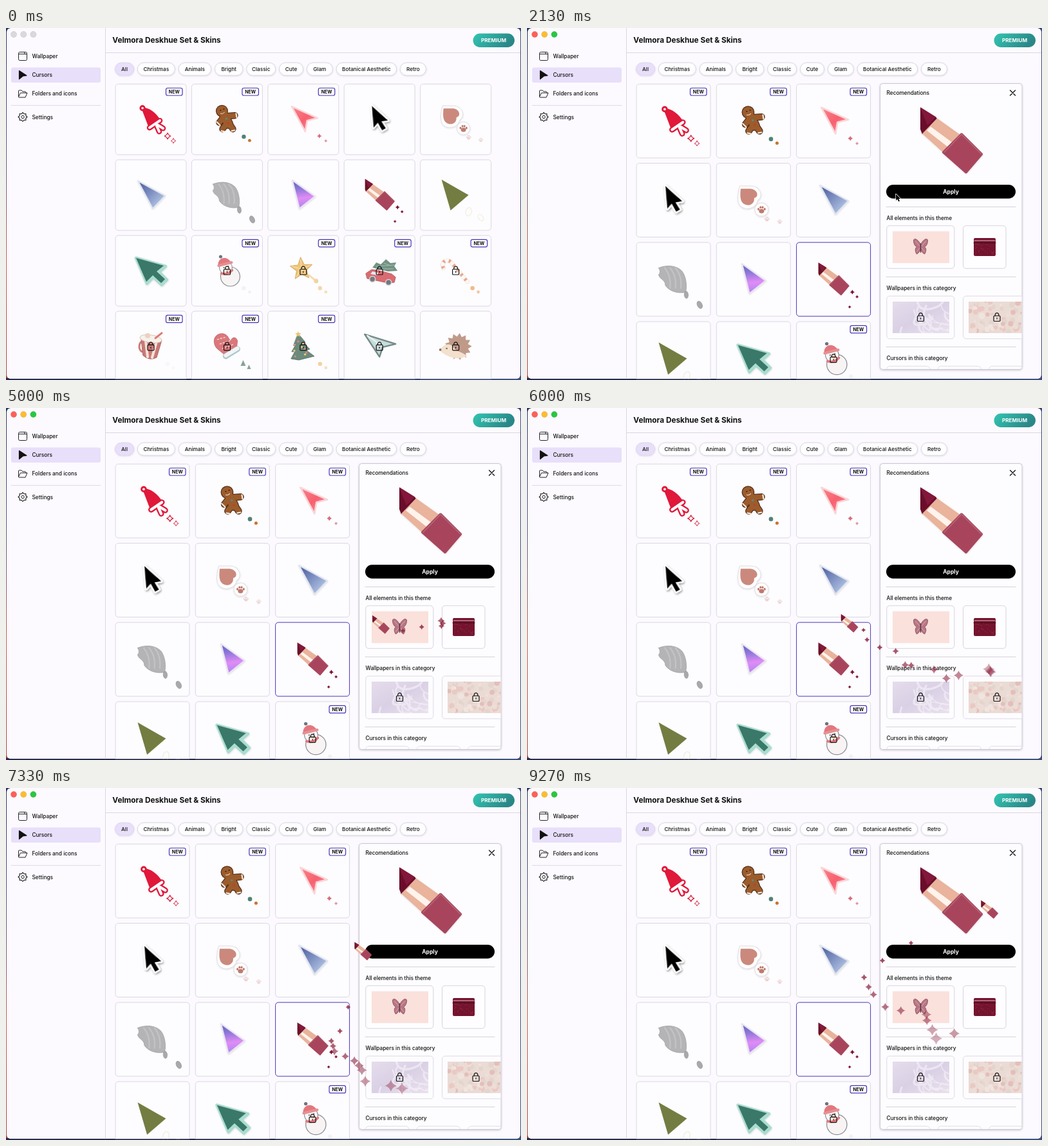
Recreate the animation shown at these times as an HTML page. Size 800 by 548 pixels, loop 9.34 s.

```html
<!DOCTYPE html>
<html lang="en">
<head>
<meta charset="utf-8">
<title>Desktop cursors</title>
<style>
  html, body { margin: 0; width: 100%; height: 100%; overflow: hidden; background: #20284c; }
  svg { display: block; width: 800px; height: 548px; }
  text { font-family: Inter, "Open Sans", sans-serif; font-size: 8.3px; font-weight: 500; fill: #111; }
  .bold { font-weight: 700; }
  .mid { text-anchor: middle; }
</style>
</head>
<body>
<svg id="stage" viewBox="0 0 800 548"></svg>
<script>
const LOOP = 9.34, OPEN = 1.35, APPLY = 4.2;

let seed = 7;
const rnd = (a, b) => {
  seed = seed * 16807 % 2147483647;
  return a + (b - a) * seed / 2147483647;
};
const times = (n, fn) => Array.from({ length: n }, (_, i) => fn(i));
const repeat = (n, fn) => times(n, fn).join('');

// ---- drawing helpers ----
const path = (d, fill = 'none', stroke = 'none', w = 1, more = '') =>
  `<path d="${d}" fill="${fill}" stroke="${stroke}" stroke-width="${w}" stroke-linejoin="round" stroke-linecap="round" ${more}/>`;
const poly = (pts, ...style) => path(`M${pts}Z`, ...style);
const line = (d, color, w = 1, more = '') => path(d, 'none', color, w, more);
const rect = (x, y, w, h, r, fill = 'none', stroke = 'none', more = '') =>
  `<rect x="${x}" y="${y}" width="${w}" height="${h}" rx="${r}" fill="${fill}" stroke="${stroke}" ${more}/>`;
const oval = (x, y, rx, ry, fill, stroke = 'none', w = 1, more = '') =>
  `<ellipse cx="${x}" cy="${y}" rx="${rx}" ry="${ry}" fill="${fill}" stroke="${stroke}" stroke-width="${w}" ${more}/>`;
const dot = (x, y, r, ...style) => oval(x, y, r, r, ...style);
const text = (s, x, y, cls = '', css = '') => `<text x="${x}" y="${y}" class="${cls}" style="${css}">${s}</text>`;
const group = (inner, more = '') => `<g ${more}>${inner}</g>`;
const place = (inner, x, y, k = 1, turn = 0) => group(inner, `transform="translate(${x} ${y}) rotate(${turn}) scale(${k})"`);
const clip = (id, x, y, w, h, r = 0) => `<clipPath id="${id}">${rect(x, y, w, h, r, '#000')}</clipPath>`;
const grad = (id, colors, x2 = 1, y2 = 1) => `<linearGradient id="${id}" x1="0" y1="0" x2="${x2}" y2="${y2}">` +
  colors.map((c, i) => `<stop offset="${i / (colors.length - 1)}" stop-color="${c}"/>`).join('') + '</linearGradient>';

// n-pointed outline whose corners alternate between two radii
const burst = (n, outer, inner, turn = 0) => times(2 * n, i => {
  const a = turn + (i / n - .5) * Math.PI, r = i % 2 ? inner : outer;
  return [(r * Math.cos(a)).toFixed(2), (r * Math.sin(a)).toFixed(2)];
}).join(' ');

const SPARK = 'M0-1Q.25-.25 1 0Q.25.25 0 1Q-.25.25-1 0Q-.25-.25 0-1Z';
const spark = (x, y, r, fill, stroke = 'none') => place(path(SPARK, fill, stroke, .25), x, y, r);
const trail = (c, d = c) => dot(81, 82, 3.2, c) + dot(90, 88, 2.4, d);
const paw = (x, y, k, c) => place(oval(0, 2, 3.4, 2.8, c) +
  repeat(4, i => oval(i * 2.7 - 4, -3.2 + 1.2 * (i - 1.5) ** 2, 1.3, 1.6, c)), x, y, k);
const lock = (x, y) => place(rect(-5, -3, 10, 8.5, 1.3, 'none', '#111', 'stroke-width="1.2"') +
  line('M-2.8-3V-4.5a2.8 2.8 0 0 1 5.6 0V-3M0 .4V2', '#111', 1.2), x, y);

const ARROW = '0 0 1 34 8 27 14 39 20 36 14 25 24 24';
const shade = 'filter="url(#soft)"', deep = 'filter="url(#deep)"';

const lipstick =
  poly('1 0 25 15 28 19 4 42 1 34', '#6b1129') + poly('1 0 25 15 12 28', '#82193a') +
  poly('4 41 27 17 62 42 36 70', '#e9b39c') + poly('11 36 17 30 51 55 44 62', '#fff3ec') +
  poly('37 70 65 42 96 73 72 101', '#a8455c', '#a8455c', 4) + line('M38 70L65 42 96 73', '#b8687b', 1.2);

const doll = 'M50 51L43 60M54 50L67 49M54 62L48 70M58 61L64 70';
const gingerbread = (color, grow) => line(doll, color, 8 + grow) + line('M51 50L57 62', color, 13 + grow) + dot(47, 42, 8.3 + grow / 2, color);
const brim = 'M53 68L69 57M64 65L68 74M66 64L74 69';
const cane = 'M36 51C31 41 42 34 49 43L73 72';
const fir = 'M47 35L58 48 55 49 65 59 60 61 72 70 48 76 36 74 42 63 37 63 44 51 41 51Z';

// ---- cursor pictures in a 110 x 110 cell ----
const icons = [
  // santa hat
  path('M42 38C52 38 62 46 68 56L53 67Z', '#e0183a', '#e0183a', 3) + line(brim, '#e0183a', 8.5) + line(brim, '#fff', 4) +
  dot(42, 37.5, 3.2, '#fff', '#e0183a', 2.8) + spark(81, 81, 4.8, '#fff', '#d4223f') + spark(90, 88.5, 3.7, '#fff', '#d4223f'),
  // gingerbread
  gingerbread('#55301d', 2.4) + gingerbread('#9c5c2c', 0) +
  line('M39 59L44 64M69 46L70 52M46 73L51 74M62 73L67 72', '#fbefe4', 2) +
  dot(45, 41, 1, '#3b1e12') + dot(50, 39, 1, '#3b1e12') + line('M45 46Q49 47 51 44', '#f3ddc9') +
  dot(54, 54, 1.7, '#5d8a78') + dot(57, 61, 1.5, '#c33b35') + trail('#4f8275', '#c9742f'),
  // pink arrow
  poly('37 35 77 53 61 57 58 74', 'url(#pink)', '#fbd5d8', 2.5) + spark(80, 81, 3.6, '#d76e7c') + spark(90, 88.5, 2.6, '#dc929b'),
  // black arrow
  place(poly(ARROW, '#000', '#fff', 4.5, 'paint-order="stroke" ' + deep), 43, 34, 1, -3),
  // heart and paw
  path('M35 34H52C66 35 70 50 61 56C59 68 44 70 37 65C30 60 31 45 35 34Z', '#fff', '#e3e0e3', 1, shade) +
  dot(67, 69, 10, '#fff', '#e3e0e3', 1, shade) +
  path('M36 38H51C61 39 64 50 56 52C57 62 46 65 40 60C35 56 35 48 36 38Z', '#cb897d') +
  paw(67, 69, 1.15, '#c07a70') + paw(75, 83, .75, '#ecd3d2') + paw(94, 87, .7, '#ecd9d8'),
  // blue triangle
  poly('35 33 77 56 58 76', 'url(#blue)', '#dfe4ee', 2, shade),
  // marble drop
  path('M33 38C45 33 60 34 68 43C75 53 75 68 73 74C61 77 48 72 43 64C43 55 34 55 33 48C36 45 35 41 33 38Z', '#b4b4b6', '#a2a2a5', .8) +
  repeat(3, i => line(`M${42 + i * 8} 38Q${52 + i * 8} 50 ${50 + i * 8} 68`, '#c3c3c5', 2)) +
  place(oval(0, 0, 3, 5.4, '#a9a9ac', '#919195', .6), 74, 78, 1, -5) + place(oval(0, 0, 3.6, 5.8, '#a9a9ac', '#919195', .6), 94, 93, 1, -25),
  // violet triangle
  poly('38 32 73 57 49 76', 'url(#violet)', '#e9e2f2', 2, shade),
  // lipstick
  place(lipstick, 32, 30, .475) + spark(83, 74, 3.4, '#7a1230') + spark(90, 81, 2.5, '#7a1230') + spark(79, 96, 2.4, '#7a1230'),
  // olive triangle
  poly('33 31 75 55 47 79', '#737d42') +
  place(oval(0, 0, 4.5, 6.5, 'none', '#f2eedd', 1.2), 75, 81, 1, 15) + place(oval(0, 0, 3.5, 5.5, 'none', '#f2eedd', 1.2), 94, 90, 1, -35),
  // teal arrow
  poly('32 35 78 48 68 57 80 69 72 77 59 65 49 75', '#aadccf', '#aadccf', 4.5, shade) +
  poly('32 35 75 47 64 56 77 68 71 74 58 62 48 72', '#3a7869'),
  // snowman
  dot(60, 64, 15, '#f5f2f0', '#59616c', 1.2) + dot(53, 50, 10, '#f8f5f3', '#59616c') +
  path('M41 47C40 34 55 30 62 43Z', '#d8454c') + line('M42 47L62 42', '#e0666a', 4) + dot(45, 33, 2.6, '#394054') +
  line('M46 59Q56 62 63 54', '#d8454c', 3.5) + dot(50, 50, 1, '#222') + dot(57, 48, 1, '#222') + line('M53 53L57 54', '#e9893c', 2) +
  trail('#efedf2'),
  // star
  line('M64 62L75 71', '#f3d296', 3) + place(poly(burst(5, 18, 8), '#e9b04a', '#cf8a28') +
    repeat(5, i => group(line('M0 0V-15', '#f9dc98'), `transform="rotate(${i * 72})"`)), 52, 52, 1, -4) +
  dot(75, 71, 3.4, '#f0c47c') + trail('#f2c98c', '#f3d6a9'),
  // car and tree
  poly('44 50 50 42 57 45 65 37 72 43 81 42 78 48 83 55 68 56', '#3f6a55') +
  line('M50 48L78 46M58 52L76 52M62 43L72 47', '#83a894') +
  poly('34 59 43 53 56 55 74 60 80 65 78 73 68 74 36 67', '#cc343b', '#9c2630') +
  poly('44 56 53 58 52 62 41 60', '#d9e7e7') + dot(44, 68, 4.5, '#42464e', '#c9c9cc', 1.5) + dot(69, 73, 4.5, '#42464e', '#c9c9cc', 1.5),
  // candy cane
  line(cane, '#ecd2c0', 6.4) + line(cane, '#fff8f1', 5.2) +
  line(cane, '#df8868', 5.2, 'stroke-dasharray="3.4 6" style="stroke-linecap:butt"') + trail('#eca05d', '#efb67e'),
  // mug
  oval(42, 55, 5, 8, 'none', '#b94a45', 3) + path('M40 41L72 45 64 72Q53 78 43 69Z', '#b94842', '#8e302f') +
  line('M47 46L50 71M64 47L57 72', '#f0dccd', 4) + place(oval(0, 0, 17, 6, '#f6eee6', '#cfae98'), 55, 43, 1, 8) +
  line('M62 42L72 34', '#d1473f', 3) + dot(50, 38, 4, '#e4c3aa') + trail('#f8f4f6'),
  // mitten
  path('M35 47C34 35 51 30 57 41L61 48C60 41 69 38 71 46L70 58 54 70 43 61Q35 56 35 47Z', '#cf454a', '#b0363f') +
  line('M53 70L71 59', '#91b2bb', 9) + line('M53 69L71 58', '#eff1f1', 6) +
  repeat(3, i => line(`M${40 + i * 4} ${44 + i * 7}L${54 + i * 5} ${40 + i * 6}`, '#f1d9d6', 1.4, 'stroke-dasharray="2 3"')) +
  poly('80 76 84 85 76 85', '#598270') + poly('89 83 92 90 86 90', '#598270'),
  // tree
  path(fir, '#355f4a', '#274938') + place(poly(burst(5, 5, 2.2), '#e3b13f'), 47, 36) +
  repeat(9, i => dot(47 + 7 * Math.sin(i * 2.2) * (1 + i / 9) + i, 47 + i * 2.9, 1.6, i % 2 ? '#e7b84d' : '#d6584e')) + trail('#f0c17d', '#f3d6a7'),
  // silver arrow
  poly('32 36 80 51 60 56 55 71', '#b4d0cb', '#3d5f5c', 2.4) + line('M36 38L59 54', '#e8f1ef', 2),
  // hedgehog
  place(poly(burst(13, 21, 15.5), '#a9755d'), 59, 55, 1, 6) +
  path('M30 60C37 51 46 48 52 57C58 64 68 64 72 70Q60 76 46 71Q32 65 30 60Z', '#f0d6bb') + dot(31, 60, 1.8, '#51342a') + dot(41, 58, 1.2, '#332')
];
const isNew = i => i < 3 || (i > 10 && i < 18);

function grid(cols, count, w, dx, dy) {
  return repeat(count, i => {
    const x = 170 + i % cols * dx, y = 87.2 + Math.floor(i / cols) * dy;
    const locked = i > 10, chosen = cols === 3 && i === 8;
    return rect(x, y, w, w, 4.5, '#fdfcfe', chosen ? '#4a38bd' : '#dad8e0') +
      group(place(icons[i], x, y, w / 110), locked ? 'opacity=".72"' : '') +
      (locked ? lock(x + w / 2, y + w / 2 + .5) : '') +
      (isNew(i) ? rect(x + w - 31.5, y + 6.3, 25.5, 11.5, 2.5, '#fff', '#4635bb', 'stroke-width="1.2"') +
        text('NEW', x + w - 18.7, y + 14.6, 'bold mid', 'font-size:7px') : '');
  });
}

function sidebar() {
  return rect(8, 61.5, 139, 23.5, 3, '#e8dffa') +
    ['Wallpaper', 'Cursors', 'Folders and icons'].map((s, i) => text(s, 40.5, 47 + i * 29)).join('') + text('Settings', 40.5, 141.5) +
    rect(19.5, 37.5, 13, 13, 2, 'none', '#222') + line('M19.5 40.5H29V37.5M29 40.5H32', '#222') +
    poly('20.5 66.5 32 74 26 75 20.5 79.5', '#111', '#111', 1.2) +
    line('M19.5 107V98Q19.5 97 20.5 97H24L26 99H30Q31 99 31 101M19.5 107L22.5 101H33L30 108H20.5Z', '#222') +
    place(poly(burst(8, 7, 5.2), 'none', '#222', 1.1) + dot(0, 0, 2.2, 'none', '#222'), 26, 138.5) +
    line('M8 120.5H147', '#dedbe5');
}

function chips() {
  const widths = { All: 30, Christmas: 59, Animals: 51.5, Bright: 44.5, Classic: 46, Cute: 38, Glam: 41, 'Botanical Aesthetic': 94.5, Retro: 41 };
  let x = 169;
  return Object.entries(widths).map(([s, w], i) => {
    const chip = rect(x + .5, 54, w - 1, 19.8, 9.9, i ? '#fefdff' : '#e8dffa', i ? '#dad8e0' : '#ded3f0', shade) +
      text(s, x + w / 2, 66.6, 'mid', 'font-size:8.2px');
    x += w + 4.8;
    return chip;
  }).join('');
}

function panel() {
  const card = (x, y, w = 105) => rect(x, y, w, 66.5, 4.5, '#fefdff', '#d6d3dd');
  const titles = ['All elements in this theme', 'Wallpapers in this category', 'Cursors in this category'];
  const wing = path('M0-4C-5-14-11-14-11-10C-11-4-8-1-6 0C-10 2-8 9-6 11C-2 9-1 5 0 2Z', '#b77684', '#854a5b', .8) +
    line('M-1-1L-8-9M-1 1L-6 7', '#e0a7ae');
  const swirls = repeat(16, () => {
    const x = rnd(560, 655), y = rnd(426, 470);
    return line(`M${x} ${y}q${rnd(-20, 5)} ${rnd(8, 20)} ${rnd(0, 25)} ${rnd(10, 30)}t${rnd(0, 18)} ${rnd(-25, 12)}`, '#f8f3fa', rnd(1, 3.5));
  });
  const tones = ['#dda7a0', '#f0e2da', '#dccbc2', '#e6b8b0', '#ead7ce'];
  const roses = repeat(75, i => dot(rnd(686, 770), rnd(426, 475), rnd(1.5, 5), tones[i % 5]));
  const clutch = rect(694, 327, 34, 28, 2, '#74132d') + repeat(40, () => dot(rnd(696, 727), rnd(335, 353), .5, '#a23a53')) +
    line('M694 334.5H728', '#430819', 1.2) + line('M695 331H727', '#dfc0c4');
  return rect(548.5, 86.5, 220.5, 445, 4, '#fdfcfe', '#cbc8d3', 'filter="url(#lift)"') +
    group(
      text('Recomendations', 558.5, 104) + line('M750.5 97L758.5 105M758.5 97L750.5 105', '#111', 1.3) +
      group(place(lipstick, 610, 123.5), shade) +
      rect(558, 244, 201, 21.5, 10.75, '#000') + text('Apply', 658.5, 257.8, 'bold mid', 'fill:#fff;font-size:8.5px') +
      titles.map((s, i) => line(`M558 ${278.5 + i * 109}H759`, '#d6d3db') + text(s, 558.5, 299 + i * 109)).join('') +
      card(558.8, 307.8) + card(677.5, 307.8, 66.5) + rect(568, 316.5, 88, 49.5, 0, '#fae1dc') +
      place(wing + group(wing, 'transform="scale(-1 1)"') + line('M0-5V8', '#5c3342', 1.6), 611.5, 341) + clutch +
      group(card(558.8, 417.3) + card(677.5, 417.3) + rect(568, 426, 88, 49, 0, 'url(#marble)') +
        group(swirls, 'opacity=".6" clip-path="url(#tile)"') + rect(686, 426, 88, 49, 0, '#e6d3cb') + group(roses, 'opacity=".8" clip-path="url(#tile2)"'), 'opacity=".8"') +
      lock(611.5, 451) + lock(730, 451) +
      group(repeat(3, i => card(558.8 + i * 79.5, 526.5, 67)), 'opacity=".7"') +
      rect(761.5, 120, 5.5, 278.5, 2.75, '#858388', 'none', 'id="bar"'), 'clip-path="url(#panelBox)"');
}

const $ = id => document.getElementById(id);

$('stage').innerHTML = `<defs>
  ${grad('desk', ['#2a3566', '#56588b', '#c9604e', '#a8433f'], 0)}${grad('floor', ['#232a4c', '#1b2344', '#3d4f80'], 1, 0)}
  ${grad('premium', ['#32c5b2', '#2a8787'], 1, .3)}${grad('pink', ['#f9848d', '#f7616f', '#fba7aa'])}${grad('blue', ['#46579a', '#8496c6', '#c8daf0'])}
  ${grad('violet', ['#5a63bd', '#8f78da', '#e08cf6', '#ae86f0'], .1)}${grad('marble', ['#e0d5e8', '#d2c6e0', '#e5dbea'])}
  <filter id="soft" x="-30%" y="-30%" width="160%" height="160%"><feDropShadow dx=".3" dy=".8" stdDeviation=".9" flood-opacity=".15"/></filter>
  <filter id="deep" x="-30%" y="-30%" width="160%" height="160%"><feDropShadow dx="1" dy="1.5" stdDeviation="1.5" flood-opacity=".45"/></filter>
  <filter id="lift"><feDropShadow dx="0" dy="1" stdDeviation="1.6" flood-opacity=".2"/></filter>
  ${clip('win', 1, 0, 798, 546.3, 6)}${clip('panelBox', 549, 87, 219.5, 444, 4)}${clip('tile', 568, 426, 88, 49)}${clip('tile2', 686, 426, 88, 49)}
  </defs>` +
  rect(0, 0, 800, 548, 0, 'url(#desk)') + rect(0, 545, 800, 3, 0, 'url(#floor)') + rect(798, 0, 2, 548, 0, '#414b79') +
  group(rect(1, 0, 798, 546.3, 6, '#fcfaff') + sidebar() + line('M154.5 0V547M154.5 38.5H800', '#dad7e0') +
    ['#ff5f57', '#febc2e', '#28c840'].map((c, i) => dot(12 + i * 15.2, 10, 4.7, c, '#0002', .6, `class="light" data-c="${c}"`)).join('') +
    text('Velmora Deskhue Set &amp; Skins', 165.3, 23.3, 'bold', 'font-size:11.8px') +
    rect(725.5, 8.5, 64.5, 21.5, 10.75, 'url(#premium)') + text('PREMIUM', 757.5, 22, 'bold mid', 'font-size:8.2px;fill:#fff') +
    chips() + group(grid(5, 20, 110, 118.4, 117.9), 'id="wide"') + group(grid(3, 12, 115, 124.3, 123.3) + panel(), 'id="narrow"'), 'clip-path="url(#win)"') +
  '<g id="sparks"></g>' +
  group(poly(ARROW, '#000', '#fff', 5, 'paint-order="stroke" transform="scale(.3)"'), 'id="mouse"') +
  group(group(lipstick, 'transform="scale(.275)"'), 'id="lip"');

// ---- motion: key points are [seconds, x, y] ----
const mouseKeys = [[.25, 640, 562], [1.05, 573, 258.5], [2.3, 573, 258.5], [3.4, 631, 258.5]];
const lipKeys = [[APPLY, 631, 258], [4.6, 628, 290], [5, 569, 323], [6, 487.5, 321], [6.9, 486, 335], [7.33, 541, 240],
  [7.7, 590, 235], [8.15, 520, 248], [8.7, 492, 232], [9.05, 590, 200], [9.27, 705, 175]];

// Hermite curve through the key points; "rest" makes it pause at each one
function along(keys, t, rest) {
  const last = keys.length - 1;
  if (t <= keys[0][0]) return keys[0].slice(1);
  if (t >= keys[last][0]) return keys[last].slice(1);
  const i = keys.findIndex(k => k[0] > t) - 1, a = keys[i], b = keys[i + 1];
  const d = b[0] - a[0], u = (t - a[0]) / d;
  const slope = (j, c) => {
    const p = keys[Math.max(j - 1, 0)], q = keys[Math.min(j + 1, last)];
    return rest ? 0 : (q[c] - p[c]) / (q[0] - p[0]) * d;
  };
  return [1, 2].map(c => a[c] + (b[c] - a[c]) * u * u * (3 - 2 * u) +
    slope(i, c) * u * (1 - u) * (1 - u) - slope(i + 1, c) * u * u * (1 - u));
}

// Sparks leave the tail of the lipstick at a steady rate, then drift down, grow and fade
const RATE = .15, LIFE = 1.9, LAG = .15;
const sparks = times(Math.floor((LOOP - APPLY - LAG) / RATE), i => {
  const born = APPLY + LAG + i * RATE, [x, y] = along(lipKeys, born - LAG);
  $('sparks').insertAdjacentHTML('beforeend', path(SPARK, '#8e2440'));
  return { born, x: x + 22 + rnd(-10, 10), y: y + 28 + rnd(-8, 8), vx: rnd(15, 45), vy: rnd(58, 78), el: $('sparks').lastChild };
});

const show = (el, on) => el.setAttribute('display', on ? 'inline' : 'none');
const move = (el, p) => el.setAttribute('transform', `translate(${p[0]} ${p[1]})`);
const lights = [...document.querySelectorAll('.light')];

function render(t) {
  const open = t >= OPEN, applied = t >= APPLY;
  show($('wide'), !open);
  show($('narrow'), open);
  for (const l of lights) l.setAttribute('fill', open ? l.dataset.c : '#dad8dc');
  $('bar').setAttribute('opacity', t < 2.8 ? 0 : Math.max(0, Math.min(1, (4.4 - t) / .3)));
  show($('mouse'), t > .25 && !applied);
  show($('lip'), applied);
  move($('mouse'), along(mouseKeys, t, true));
  move($('lip'), along(lipKeys, t));
  for (const s of sparks) {
    const age = t - s.born, on = age >= 0 && age < LIFE;
    show(s.el, on);
    if (!on) continue;
    s.el.setAttribute('transform', `translate(${s.x + s.vx * age} ${s.y + s.vy * age}) scale(${3.4 + 3.4 * age})`);
    s.el.setAttribute('opacity', Math.min(.9 - .3 * age, (LIFE - age) * 6));
  }
}

const start = performance.now();
(function tick() {
  render((performance.now() - start) / 1000 % LOOP);
  requestAnimationFrame(tick);
})();
</script>
</body>
</html>
```
